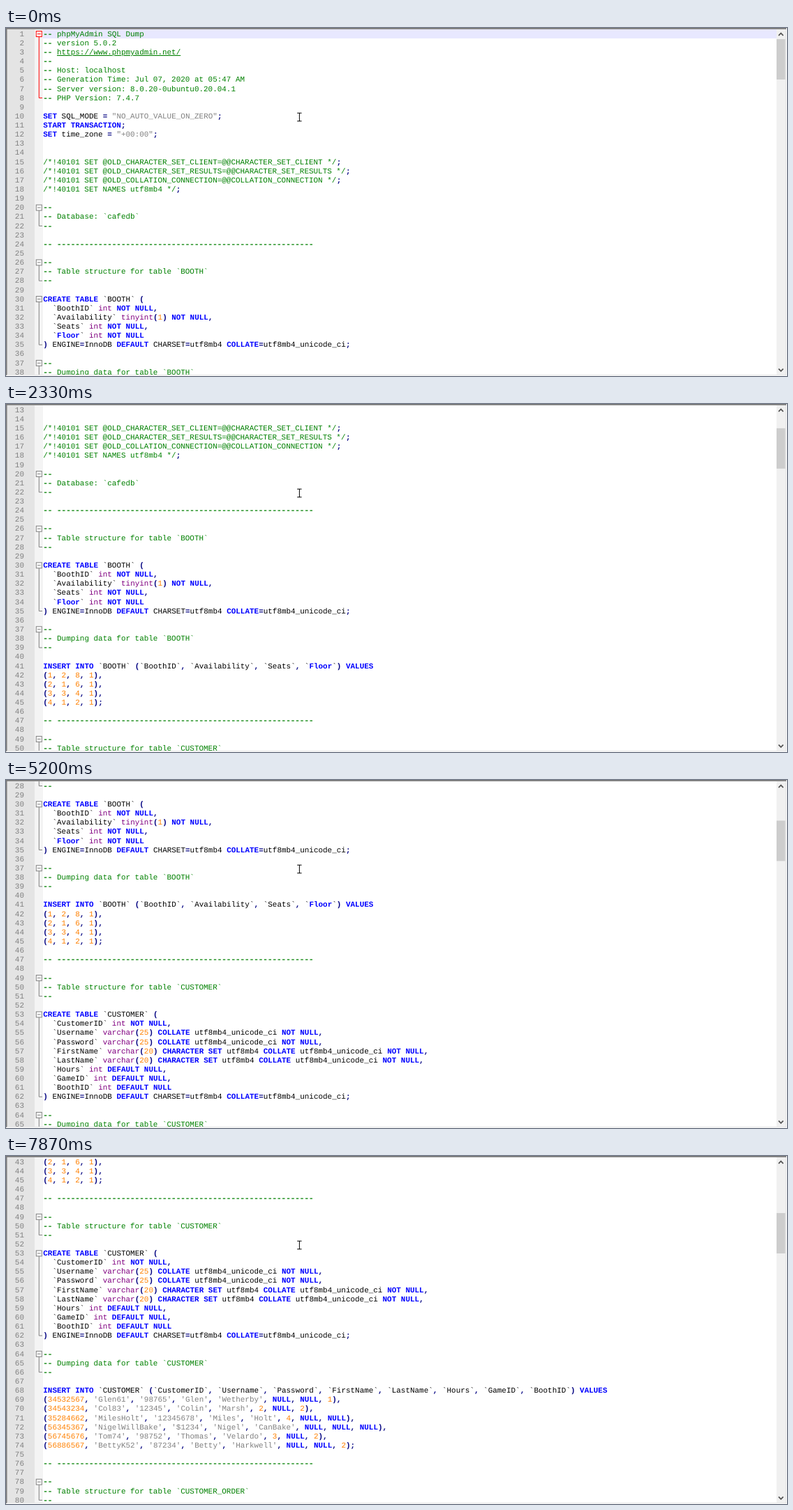
Write an HTML page that moves like this. It is 1119 px wide and 500 px high and loops after 8 s.

```html
<!DOCTYPE html>
<html lang="en">
<head>
<meta charset="utf-8">
<title>SQL dump scrolling</title>
<style>
  html, body { margin: 0; width: 100%; height: 100%; overflow: hidden; background: #fff; }
  svg { display: block; width: 1119px; height: 500px; }
  text { font: 10.95px "Courier New", "Liberation Mono", monospace; text-rendering: geometricPrecision; white-space: pre; }
  .comment, .link, .dashes { fill: #008000; }
  .dashes { stroke: #008000; stroke-width: .4; }
  .link { text-decoration: underline; }
  .string, .lineno { fill: #808080; }
  .number { fill: #ff8000; }
  .type { fill: #800080; }
  .keyword { fill: #00f; font-weight: bold; }
  .operator { fill: #000080; font-weight: bold; }
  .fold { fill: none; stroke: #808080; }
  .fold.active { stroke: #f00; }
  .fold rect { fill: #fff; }
</style>
</head>
<body>
<script type="text/plain" id="sql">
-- phpMyAdmin SQL Dump
-- version 5.0.2
-- https://www.phpmyadmin.net/
--
-- Host: localhost
-- Generation Time: Jul 07, 2020 at 05:47 AM
-- Server version: 8.0.20-0ubuntu0.20.04.1
-- PHP Version: 7.4.7

SET SQL_MODE = "NO_AUTO_VALUE_ON_ZERO";
START TRANSACTION;
SET time_zone = "+00:00";


/*!40101 SET @OLD_CHARACTER_SET_CLIENT=@@CHARACTER_SET_CLIENT */;
/*!40101 SET @OLD_CHARACTER_SET_RESULTS=@@CHARACTER_SET_RESULTS */;
/*!40101 SET @OLD_COLLATION_CONNECTION=@@COLLATION_CONNECTION */;
/*!40101 SET NAMES utf8mb4 */;

--
-- Database: `cafedb`
--

-- --------------------------------------------------------

--
-- Table structure for table `BOOTH`
--

CREATE TABLE `BOOTH` (
  `BoothID` int NOT NULL,
  `Availability` tinyint(1) NOT NULL,
  `Seats` int NOT NULL,
  `Floor` int NOT NULL
) ENGINE=InnoDB DEFAULT CHARSET=utf8mb4 COLLATE=utf8mb4_unicode_ci;

--
-- Dumping data for table `BOOTH`
--

INSERT INTO `BOOTH` (`BoothID`, `Availability`, `Seats`, `Floor`) VALUES
(1, 2, 8, 1),
(2, 1, 6, 1),
(3, 3, 4, 1),
(4, 1, 2, 1);

-- --------------------------------------------------------

--
-- Table structure for table `CUSTOMER`
--

CREATE TABLE `CUSTOMER` (
  `CustomerID` int NOT NULL,
  `Username` varchar(25) COLLATE utf8mb4_unicode_ci NOT NULL,
  `Password` varchar(25) COLLATE utf8mb4_unicode_ci NOT NULL,
  `FirstName` varchar(20) CHARACTER SET utf8mb4 COLLATE utf8mb4_unicode_ci NOT NULL,
  `LastName` varchar(20) CHARACTER SET utf8mb4 COLLATE utf8mb4_unicode_ci NOT NULL,
  `Hours` int DEFAULT NULL,
  `GameID` int DEFAULT NULL,
  `BoothID` int DEFAULT NULL
) ENGINE=InnoDB DEFAULT CHARSET=utf8mb4 COLLATE=utf8mb4_unicode_ci;

--
-- Dumping data for table `CUSTOMER`
--

INSERT INTO `CUSTOMER` (`CustomerID`, `Username`, `Password`, `FirstName`, `LastName`, `Hours`, `GameID`, `BoothID`) VALUES
(34532567, 'Glen61', '98765', 'Glen', 'Wetherby', NULL, NULL, 1),
(34543234, 'Col83', '12345', 'Colin', 'Marsh', 2, NULL, 2),
(35284662, 'MilesHolt', '12345678', 'Miles', 'Holt', 4, NULL, NULL),
(56345367, 'NigelWillBake', '$1234', 'Nigel', 'CanBake', NULL, NULL, NULL),
(56745676, 'Tom74', '98752', 'Thomas', 'Velardo', 3, NULL, 2),
(56886567, 'BettyK52', '87234', 'Betty', 'Harkwell', NULL, NULL, 2);

-- --------------------------------------------------------

--
-- Table structure for table `CUSTOMER_ORDER`
--
</script>
<svg viewBox="0 0 1119 500">
  <defs><clipPath id="view"><rect x="2" y="2" width="1102" height="496"/></clipPath></defs>
  <rect width="1119" height="500" fill="#fff"/>
  <rect x="2" y="2" width="39" height="496" fill="#e4e4e4"/>
  <rect x="41" y="2" width="12" height="496" fill="#f4f4f4"/>
  <g clip-path="url(#view)"><g id="page"><rect x="53" y="2" width="1051" height="13" fill="#e8e8ff"/></g></g>
  <rect x="1104" y="2" width="13" height="496" fill="#f0f0f0"/>
  <rect id="thumb" x="1104" y="16" width="12.5" height="58" fill="#cdcdcd"/>
  <path d="M1107 10.8l3.3-3.3 3.3 3.3M1107 489.7l3.3 3.3 3.3-3.3" fill="none" stroke="#505050" stroke-width="1.7"/>
  <path d="M0 .9H1118M.8 0V499" stroke="#787878" stroke-width="1.6"/>
  <path d="M1 498.7H1118M1117.6 2V499" stroke="#e3e3e3"/>
  <path d="M417.2 122.2h6.4M417.2 133.8h6.4M420.4 122V134" fill="none" stroke="#000"/>
</svg>
<script>
const CHAR = 6.571, LINE = 13.137, TEXT_X = 53.3, BASELINE = 11.7, LOOP = 8000;
const page = document.getElementById("page");
const thumb = document.getElementById("thumb");

const KEYWORD = /^(SET|START|TRANSACTION|CREATE|TABLE|NOT|NULL|DEFAULT|COLLATE|INSERT|INTO|VALUES|CHARACTER|Floor)$/;
const TOKEN = /(?<link>https:\S+)|(?<dashes>-{2,})|(?<comment>(?<=^-- ).+|\/\*.*?\*\/)|(?<string>'[^']*'|"[^"]*")|(?<number>\b\d+\b)|(?<word>\w+)|(?<operator>[(),;=]+)|(?<plain>\S)/g;

// First and last line of each foldable block.
const FOLDS = [[1, 8], [20, 22], [26, 28], [30, 35], [37, 39], [49, 51], [53, 62], [64, 66], [78, 80]];

// Each wheel notch moves three lines; after some the scrollbar follows late.
const NOTCHES = [930, 1600, 2070, 2330, 2800, 3530, 4400, 4800, 5200, 6000, 6470, 6800, 7200, 7800];
const LATE = [2800, 4800, 6470, 7800];
const THUMB_TIMES = NOTCHES.map(t => LATE.includes(t) ? t + 60 : t);

function add(parent, name, attrs, content = "") {
  const el = document.createElementNS("http://www.w3.org/2000/svg", name);
  for (const key in attrs) el.setAttribute(key, attrs[key]);
  el.textContent = content;
  return parent.appendChild(el);
}

function styleOf(kind, text) {
  if (kind !== "word") return kind;
  if (KEYWORD.test(text)) return "keyword";
  return /^(int|tinyint|varchar)$/.test(text) ? "type" : "plain";
}

function drawLine(source, index) {
  const y = BASELINE + index * LINE;
  add(page, "text", { x: 26, y, class: "lineno", "text-anchor": "end" }, index + 1);
  for (const match of source.matchAll(TOKEN)) {
    const [kind, text] = Object.entries(match.groups).find(([, value]) => value !== undefined);
    add(page, "text", { x: TEXT_X + match.index * CHAR, y, class: styleOf(kind, text) }, text);
  }
}

function drawFold([first, last]) {
  const middle = line => 8.5 + (line - 1) * LINE;
  const top = middle(first), bottom = middle(last);
  const group = add(page, "g", { class: first === 1 ? "fold active" : "fold" });
  add(group, "path", { d: `M47.3 ${top + 4}V${bottom}H52` });
  add(group, "rect", { x: 43.3, y: top - 4, width: 8, height: 8 });
  add(group, "path", { d: `M45 ${top}h4.6` });
}

document.getElementById("sql").textContent.trim().split("\n").forEach(drawLine);
FOLDS.forEach(drawFold);

const linesScrolled = (times, t) => 3 * times.filter(time => time <= t).length;

function render(t) {
  page.setAttribute("transform", `translate(0 ${-linesScrolled(NOTCHES, t) * LINE})`);
  thumb.setAttribute("y", 16 + linesScrolled(THUMB_TIMES, t) * 1.57);
}

const start = performance.now();
function tick() {
  render((performance.now() - start) % LOOP);
  requestAnimationFrame(tick);
}
render(0);
requestAnimationFrame(tick);
</script>
</body>
</html>
```
